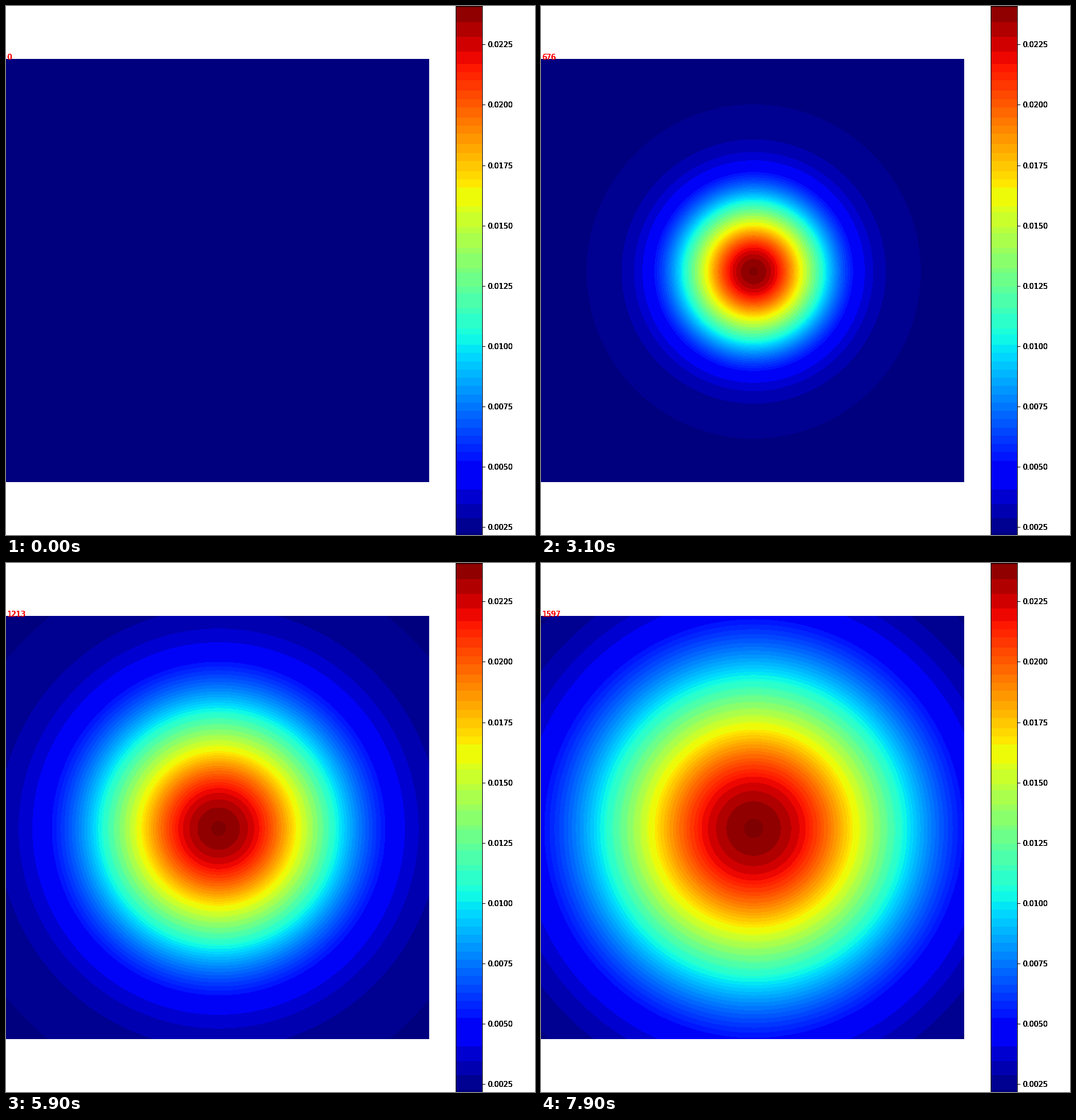
Animation of 720 by 720 pixels, one loop 8000 ms. Source, as a matplotlib script:

```python
import numpy as np
import matplotlib
import matplotlib.pyplot as plt
from matplotlib.animation import FuncAnimation

SIZE, FIELD, CELL = 720, 576, 2.88
FRAMES, INTERVAL = 80, 100
V_MIN, V_MAX = 0.00218, 0.02409
TIMES = np.concatenate([[0], np.linspace(100, 2000, 100)])

plt.rcParams["font.family"] = "DejaVu Sans"
plt.rcParams["font.size"] = 10


def banded_jet():
    """Jet reduced to bands: 3 bits of red and blue, 4 bits of green."""
    rgb = matplotlib.colormaps["jet"](np.arange(256), bytes=True)[:, :3].astype(int)
    keys = rgb >> np.array([5, 4, 5])
    out = np.zeros((256, 3), np.uint8)
    for key in np.unique(keys, axis=0):
        band = (keys == key).all(axis=1)
        out[band] = rgb[band].mean(axis=0).round()
    return out


def crisp_text(x, y, s, **kw):
    """Stacked copies harden the soft glyph edges; x, y in pixels from top left."""
    return [fig.text(x / SIZE, 1 - y / SIZE, s, **kw) for _ in range(4)]


palette = banded_jet()

# Squared distance from the centre of the packet, in pixels
mid = FIELD / 2 + CELL / 2
axis = np.arange(FIELD) + 0.5 - mid
r2 = axis[:, None] ** 2 + axis[None, :] ** 2
corner2 = 2 * (FIELD / 2) ** 2


def field(k):
    """Spreading Gaussian, rescaled to the full colour range."""
    if k == 0:
        return np.broadcast_to(palette[0], (FIELD, FIELD, 3))
    width = 1656 + 0.0168 * TIMES[k] ** 2
    low = np.exp(-corner2 / width)
    level = (np.exp(-r2 / width) - low) / (1 - low)
    return palette[np.clip(level * 256, 0, 255).astype(int)]


fig = plt.figure(figsize=(10, 10), dpi=72, facecolor="white")

ax = fig.add_axes([0, 0.1, 0.8, 0.8])
ax.axis("off")
image = ax.imshow(field(0), interpolation="nearest", aspect="auto")

bar = fig.add_axes([0.85, 0, 0.05, 1])
bar.imshow(palette[::-1, None], extent=[0, 1, V_MIN, V_MAX],
           interpolation="nearest", aspect="auto")
bar.set_xticks([])
bar.yaxis.tick_right()
ticks = np.arange(1, 10) * 0.0025
bar.set_yticks(ticks, labels=[""] * len(ticks))
for v in ticks:
    y = SIZE * (V_MAX - v) / (V_MAX - V_MIN)
    crisp_text(655, y, f"{v:.4f}", va="center_baseline")

counter = crisp_text(CELL / 2, 72 + CELL / 2, "0", color="red")


def update(k):
    image.set_data(field(k))
    for label in counter:
        label.set_text(f"{TIMES[k]:.0f}")
    return [image, *counter]


anim = FuncAnimation(fig, update, frames=FRAMES, interval=INTERVAL,
                     repeat=True, repeat_delay=0, blit=False)
plt.show()
```
